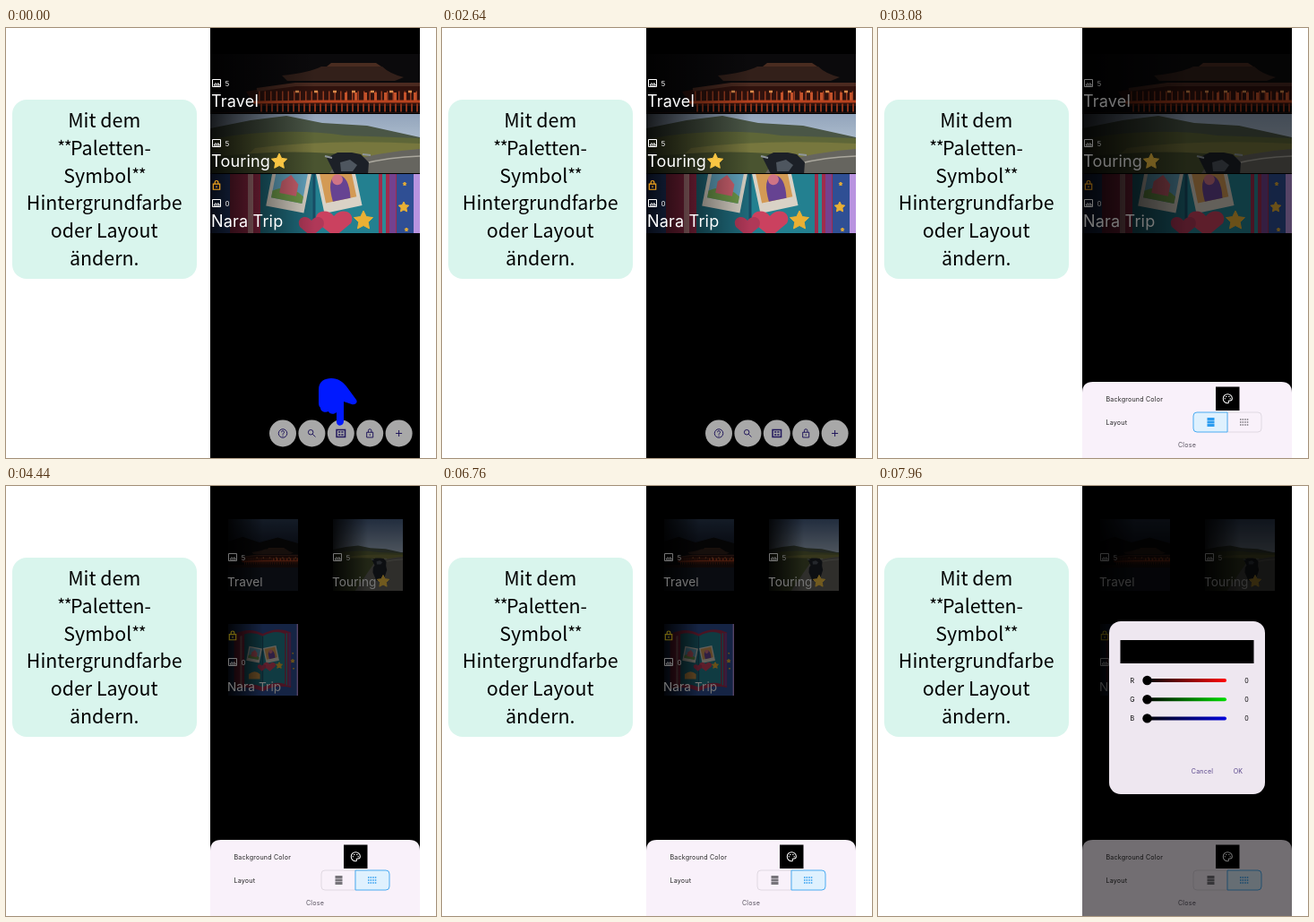
An HTML page for the animation above (8000 ms loop, 480 px wide and 480 px high).

```html
<!DOCTYPE html>
<html lang="de">
<head>
<meta charset="utf-8">
<style>
  html, body { margin: 0; width: 100%; height: 100%; overflow: hidden; background: #fff; }
  svg { display: block; }
  #stage { width: 100vw; height: 100vh; font-family: Inter, Roboto, sans-serif; }
  .note { font: 21.4px "Noto Sans CJK JP", "Noto Sans CJK SC", "Open Sans", sans-serif; text-anchor: middle; }
  .small { font-size: 7.1px; letter-spacing: .2px; }
  .mid { text-anchor: middle; }
</style>
</head>
<body>
<svg id="stage" viewBox="0 0 480 480">
  <defs>
    <linearGradient id="shade">
      <stop offset="0" stop-opacity=".85"/><stop offset=".25" stop-opacity=".45"/><stop offset=".5" stop-opacity="0"/>
    </linearGradient>
    <linearGradient id="dusk" x2="0" y2="1">
      <stop offset="0" stop-color="#2b3b54"/><stop offset="1" stop-color="#121826"/>
    </linearGradient>
    <linearGradient id="day" x2="0" y2="1">
      <stop offset="0" stop-color="#4a6288"/><stop offset="1" stop-color="#a9b9cb"/>
    </linearGradient>
    <clipPath id="phone"><path d="M228 0h234v480H228z"/></clipPath>

    <symbol id="travel" viewBox="0 0 234 234" preserveAspectRatio="xMidYMid slice">
      <path d="M0 0h234v90H0z" fill="url(#dusk)"/>
      <path d="M0 74L50 58 105 76 165 60 234 80V234H0z" fill="#0b0a0c"/>
      <path d="M80 108Q110 105 124 98H192Q200 106 216 110L206 114H86z" fill="#33201a"/>
      <path d="M130 98l5-4h50l6 4z" fill="#4a2c20"/>
      <path d="M40 126L90 117H234V142H50z" fill="#30120d"/>
      <path d="M52 124L95 118H234" fill="none" stroke="#4b2a20" stroke-width="4"/>
      <path d="M54 131H234" stroke="#9c3d20" stroke-width="11" stroke-dasharray="1.5 5"/>
      <path d="M95 126H234" stroke="#d98a4a" stroke-width="2.500" stroke-dasharray="4 17"/>
      <path d="M150 132H234" stroke="#c4522a" stroke-width="10" stroke-dasharray="3 8"/>
      <path d="M48 138L120 137H234" fill="none" stroke="#b8431f" stroke-width="3"/>
      <path d="M56 144H234" stroke="#8a3119" stroke-width="9" stroke-dasharray="2 4"/>
      <path d="M0 149H234V234H0z" fill="#24120f"/>
      <path d="M0 158H234V234H0z" fill="#151b26"/>
    </symbol>

    <symbol id="touring" viewBox="0 0 234 234" preserveAspectRatio="xMidYMid slice">
      <path d="M0 0h234v110H0z" fill="url(#day)"/>
      <path d="M0 100L45 91 85 86 125 94 175 97 234 110V234H0z" fill="#4a5646"/>
      <path d="M0 112Q80 98 150 108L234 111V234H0z" fill="#5e6638"/>
      <path d="M50 122Q130 112 234 117V140H30z" fill="#77773e"/>
      <path d="M0 132Q90 122 160 130L120 234H0z" fill="#4a5430"/>
      <path d="M75 234L140 140Q190 126 234 123V234z" fill="#66655f"/>
      <path d="M168 140Q200 132 234 131" fill="none" stroke="#aaa79d" stroke-width="1.500"/>
      <path d="M130 133l12-6h16l10 2 9 9-1 14 3 14-9 28-25 8-12-28 1-15 5-8z" fill="#1c2027"/>
      <path d="M145 138l11-3 8 6-5 7h-13z" fill="#4e565f"/>
      <path d="M128 131l8 2M170 129l9 1" stroke="#8f969c" stroke-width="2"/>
    </symbol>

    <symbol id="nara" viewBox="0 0 234 234" preserveAspectRatio="xMidYMid slice">
      <path d="M0 0h234v234H0z" fill="#2f4f94"/>
      <path d="M22 34Q70 8 116 32 165 6 208 28V208Q160 196 116 220 70 200 22 212z" fill="#a02c4c"/>
      <path d="M56 34Q85 24 116 40V206Q85 194 56 198z" fill="#1f6b7c"/>
      <path d="M116 40Q155 18 188 32V196Q155 186 116 206z" fill="#238090"/>
      <path d="M42 40l6-2v160l-6 2z" fill="#c98a8e"/>
      <path d="M116 40V206" stroke="#174c64" stroke-width="3"/>
      <path d="M192 30h4v170h-4z" fill="#2b8a96"/>
      <path d="M200 30h7v172h-7z" fill="#74418f"/>
      <path d="M227 0h7v234h-7z" fill="#b994e0"/>
      <g transform="rotate(11 88 102)">
        <path d="M66 76h43v48H66z" fill="#d9d2c6"/>
        <path d="M70 80h35v34H70z" fill="#62a4bf"/>
        <path d="M70 106q17-12 35 0v8H70z" fill="#6f9a4a"/>
        <path d="M78 94l9-9 10 9v13H78z" fill="#cf6270"/>
      </g>
      <g transform="rotate(-12 144 100)">
        <path d="M122 74h43v50h-43z" fill="#d9d2c6"/>
        <path d="M126 78h35v35h-35z" fill="#d39a55"/>
        <path d="M134 113q-2-26 10-28 14 2 10 28z" fill="#664392"/>
        <circle cx="144" cy="90" r="6" fill="#cf7486"/>
      </g>
      <path d="M139 154L120 139C112 127 130 120 138 131 147 120 163 127 157 139z" fill="#cb415f"/>
      <path d="M113 154L100 143C95 133 107 128 113 136 119 128 130 133 126 143z" fill="#b03858"/>
      <path d="M70 164q20-17 37 0v16H70z" fill="#d0964a"/>
    </symbol>
  </defs>

  <rect x="7" y="80" width="206" height="200" rx="16" fill="#d9f5ed"/>
  <g id="note" class="note"></g>

  <g clip-path="url(#phone)">
    <path d="M228 0h234v480H228z"/>
    <g id="list"></g>
    <g id="grid"></g>
    <g id="buttons"></g>
    <path id="dim" d="M228 0h234v480H228z"/>
    <g id="sheet"></g>
    <path id="dim2" d="M228 0h234v480H228z"/>
    <g id="dialog"></g>
    <path id="hand" fill="#0019ff" d="M349 404C349 394 356 391 363 391 371 391 376 395 380 400L391 415C393 418 390 421 386 420L377 417V439C377 445 369 445 369 440V429C366 432 361 431 360 428 356 430 351 428 351 424 349 422 349 420 349 417z"/>
  </g>
</svg>
<script>
const $ = id => document.getElementById(id);
const text = (s, x, y, attrs = '') => `<text x="${x}" y="${y}" ${attrs}>${s}</text>`;
const icon = (d, x, y, k, color, w = 2) =>
  `<path d="${d}" transform="translate(${x} ${y}) scale(${k}) translate(-12 -12)" fill="none" stroke="${color}" stroke-width="${w}"/>`;

const star = (x, y, r, color = '#f8c543') => {
  const pts = Array.from({ length: 10 }, (_, i) => {
    const a = i * Math.PI / 5 - Math.PI / 2, q = i % 2 ? r * .5 : r;
    return `${(x + q * Math.cos(a)).toFixed(1)},${(y + q * Math.sin(a)).toFixed(1)}`;
  });
  return `<polygon points="${pts.join(' ')}" fill="${color}" stroke="${color}" stroke-linejoin="round"/>`;
};

const ICON = {
  image: 'M3 4H21V20H3zM6 17L10 12 13 15 15.500 12 19 17z',
  unlock: 'M5 9.500H19V21H5zM8.500 9.500V6A3.500 3.500 0 0 1 15.500 6V9.500M12 13.500V17',
  help: 'M2.500 12A9.500 9.500 0 1 0 21.500 12 9.500 9.500 0 1 0 2.500 12M9 9.500A3 3 0 1 1 13.500 12Q12 13 12 15M12 16.500V18.500',
  search: 'M4 9.500A5.500 5.500 0 1 0 15 9.500 5.500 5.500 0 1 0 4 9.500M13.500 13.500L20 20',
  layout: 'M2.500 4H21.500V20H2.500zM6.500 9.200H11M13 9.200H17.500M6.500 14.800H11M13 14.800H17.500',
  plus: 'M12 5V19M5 12H19',
  palette: 'M12 3C7 3 3 7 3 12S7 21 12 21A2 2 0 0 0 14 18.500C13 17 14 16 15 16H17C19.500 16 21 14 21 11.500 21 7 17 3 12 3zM5.500 12H8M8 8H10.500M13.500 8H16M16 12H18.500'
};

// Left note
const stars = '<tspan font-size="19" letter-spacing="-1.5" dy="-1.5">**</tspan>';
$('note').innerHTML = [
  'Mit dem', stars + '<tspan dy="1.5">Paletten-</tspan>', 'Symbol' + stars,
  'Hintergrundfarbe', 'oder Layout', 'ändern.'
].map((s, i) => text(s, 109.7, 111 + i * 30.8)).join('');

// Albums in both layouts
const albums = [
  { id: 'travel', name: 'Travel', count: 5 },
  { id: 'touring', name: 'Touring', count: 5, star: true },
  { id: 'nara', name: 'Nara Trip', count: 0, locked: true }
];

// Square artwork of 234 units, cropped to its middle in the list
const naraStars = (x, y, w, h) => {
  const k = w / 234, top = (w - h) / 2;
  return [[171, 136, 11], [216, 121, 6], [217, 95, 2], [219, 146, 2]]
    .map(([sx, sy, r]) => star(x + sx * k, y + sy * k - top, r * k, '#e9b034')).join('');
};
const photo = (id, layout, x, y, w, h) => {
  const box = `x="${x}" y="${y}" width="${w}" height="${h}"`;
  return `<g id="${layout}-${id}"><use href="#${id}" ${box}/>` +
    (id === 'nara' ? naraStars(x, y, w, h) : '') + `<rect ${box} fill="url(#shade)"/></g>`;
};

$('list').innerHTML = albums.map((a, i) => {
  const y = 29 + i * 67;
  return photo(a.id, 'list', 228, y, 234, 66) +
    (a.locked ? icon(ICON.unlock, 235, y + 12.5, .53, '#f5a51d', 2.2) : '') +
    icon(ICON.image, 235, y + 32.5, .5, '#fff') +
    text(a.count, 244.5, y + 35.7, 'fill="#eee" font-size="8"') +
    text(a.name, 229, y + 59, 'fill="#fff" font-size="18" letter-spacing=".2"') +
    (a.star ? star(305, y + 53, 9) : '');
}).join('');

$('grid').innerHTML = albums.map((a, i) => {
  const x = 248 + i % 2 * 117, y = 37 + (i >> 1) * 117;
  return photo(a.id, 'grid', x, y, 78, 80) +
    (a.locked ? icon(ICON.unlock, x + 5, y + 13, .53, '#f5d51d', 2.2) : '') +
    icon(ICON.image, x + 5, y + 42.5, .5, '#fff') +
    text(a.count, x + 14.5, y + 45.7, 'fill="#eee" font-size="8"') +
    text(a.name, x - 1, y + 74.5, 'fill="#fff" font-size="13.6" letter-spacing=".1"') +
    (a.star ? star(x + 56, y + 69.5, 7) : '');
}).join('');

$('buttons').innerHTML = ['help', 'search', 'layout', 'unlock', 'plus'].map((name, i) => {
  const x = 309 + i * 32.4;
  return `<circle cx="${x}" cy="452.5" r="15" fill="#a8a8a8"/>` +
    icon(ICON[name], x, 452.5, .5, '#21175c', name === 'layout' ? 3 : 2);
}).join('');

// Bottom sheet with the layout switch
const toggle = (id, mode) => {
  const listOn = mode === 'list', on = '#2b9cf0', off = '#77747a';
  const left = 'M390 429H356Q352 429 352 433V447Q352 451 356 451H390z';
  const right = 'M390 429H424Q428 429 428 433V447Q428 451 424 451H390z';
  const half = (d, active) =>
    `<path d="${d}" fill="${active ? '#dff1fe' : 'none'}" stroke="${active ? '#4bacf2' : '#e0d9e2'}"/>`;
  return `<g id="${id}">` +
    (listOn ? half(right, false) + half(left, true) : half(left, false) + half(right, true)) +
    `<path d="M367.500 436.500h8M367.500 440h8M367.500 443.500h8" stroke="${listOn ? on : off}" stroke-width="2.8"/>` +
    `<path d="M404 437h10M404 440h10M404 443h10" stroke="${listOn ? off : on}" stroke-width="1.5" stroke-dasharray="1.500 1.100"/></g>`;
};
$('sheet').innerHTML =
  '<path d="M228 480V407Q228 395 240 395H450Q462 395 462 407V480z" fill="#f9f1fa"/>' +
  '<path d="M377 400.500h26.500v26.500H377z"/>' + icon(ICON.palette, 390.3, 413.7, .56, '#fff', 1.8) +
  text('Background Color', 254.5, 416.5, 'class="small" fill="#222"') +
  text('Layout', 254.5, 442.5, 'class="small" fill="#222"') +
  text('Close', 345, 468, 'class="small mid" fill="#55505c"') +
  toggle('onList', 'list') + toggle('onGrid', 'grid');

// Colour dialog
$('dialog').innerHTML =
  '<rect x="258" y="151" width="174" height="193" rx="13" fill="#eee7f0"/><path d="M270.500 172h149v26h-149z"/>' +
  [['R', '#f00'], ['G', '#0d0'], ['B', '#00d']].map(([name, color], i) => {
    const y = 217 + i * 21.2;
    return `<linearGradient id="ramp${name}"><stop/><stop offset="1" stop-color="${color}"/></linearGradient>` +
      `<rect x="299" y="${y - 2}" width="90" height="4" rx="2" fill="url(#ramp${name})"/>` +
      `<circle cx="300.500" cy="${y}" r="5.200"/>` +
      text(name, 284, y + 2.7, 'class="small mid"') + text(0, 411.5, y + 2.7, 'class="small mid"');
  }).join('') +
  text('Cancel', 362, 320.500, 'class="small mid" fill="#5a488c"') +
  text('OK', 402, 320.500, 'class="small mid" fill="#5a488c"');

const LOOP = 8000, SCRIM = .54;
const ramp = (t, from, to) => Math.min(1, Math.max(0, (t - from) / (to - from)));
const easeOut = p => 1 - (1 - p) ** 3;
const show = (id, on) => { $(id).style.display = on ? '' : 'none'; };
const fade = (id, a) => $(id).setAttribute('opacity', a);

function draw(t) {
  const scale = 1 + .23 * Math.sin(Math.PI * ramp(t, 500, 1330));
  $('hand').setAttribute('transform', `translate(370.5 417.5) scale(${scale}) translate(-370.5 -417.5)`);
  fade('hand', 1 - ramp(t, 1330, 1480));

  const open = easeOut(ramp(t, 2700, 3060));
  $('sheet').setAttribute('transform', `translate(0 ${85 * (1 - open)})`);
  fade('dim', SCRIM * open);

  const grid = t >= 4120 && t < 5840 || t >= 6760;
  show('grid', grid);
  show('list', !grid);
  show('onGrid', grid);
  show('onList', !grid);
  show('list-touring', t < 5840 || t >= 5880);

  const pop = easeOut(ramp(t, 7720, 7940));
  fade('dim2', SCRIM * pop);
  fade('dialog', pop);
}

function tick(now) {
  draw(now % LOOP);
  requestAnimationFrame(tick);
}
draw(0);
requestAnimationFrame(tick);
</script>
</body>
</html>
```
